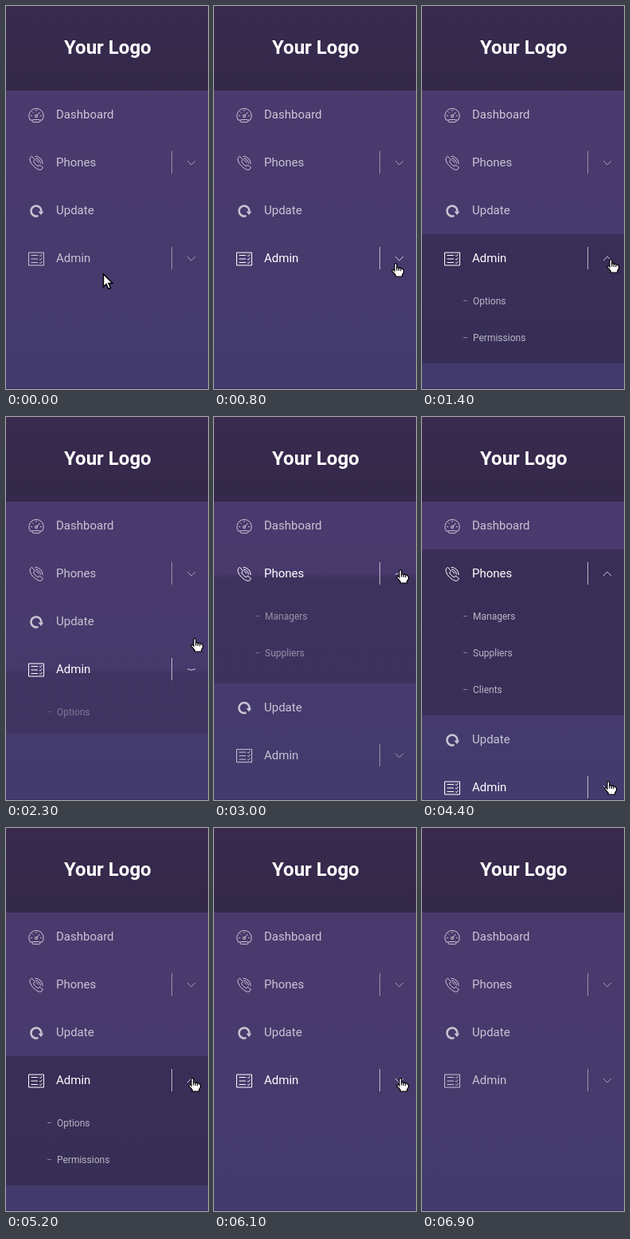
These frames come from a looping animation (254x480 px, 8 s). An HTML page with a canvas:

```html
<!DOCTYPE html>
<html lang="en">
<head>
<meta charset="utf-8">
<title>Side menu</title>
<style>
  html, body { margin: 0; width: 100%; height: 100%; overflow: hidden; background: #433b6d; }
  canvas { display: block; }
</style>
</head>
<body>
<canvas id="stage" width="254" height="480"></canvas>
<script>
const W = 254, H = 480, LOOP = 8000, STEP = 100;
const HEADER = 106, ROW = 60, SUB = 46, SUB_PAD = 10;
const ctx = document.getElementById('stage').getContext('2d');

// Icons are drawn around the centre of their row.
const icons = {
  gauge: new Path2D('M-5 6.5H-7.5A9.2 9.2 0 1 1 7.5 6.5H5M-3.5 6H3.5A1.5 1.5 0 0 1 3.5 9H-3.5A1.5 1.5 0 0 1 -3.5 6M-1.5 1.5A1.5 1.5 0 1 0 1.5 1.5A1.5 1.5 0 1 0 -1.5 1.5M1 .5L4.5 -3.5M-6.8 1H-5M5 1H6.8M-5 -4L-3.8 -2.8M0 -6.5V-4.7'),
  phone: new Path2D('M-8 -6L-5.5 -8.2L-1.5 -3.5L-3.5 -1.5Q-1.5 2.5 2.5 4.5L4.2 2.5L8.5 6L6.5 8.5Q3.5 10 -2.5 5Q-8.5 -.5 -8 -6ZM-1.5 -8.2Q7.5 -7.5 8.2 1.5M-1 -5.5Q4.8 -5 5.5 1M0 -3Q2.5 -2.5 3 0'),
  refresh: new Path2D('M2.5 6.4A6.5 6.5 0 1 1 6.4 1'),
  refreshTip: new Path2D('M2.5 1H9.2L6 5.5Z'),
  list: new Path2D('M-9.5 -7.5H9.5V8.5H-9.5ZM-6.5 -4H2M-6.5 .5H2M-6.5 5H2M4 -4L5.2 -2.8L7.5 -5.5M4 .5L5.2 1.7L7.5 -1M4 5L5.2 6.2L7.5 3.5')
};
const arrow = new Path2D('M.5 1V17L4.2 13.5L6.8 19.5L9.6 18.3L7 12.5H12Z');
const hand = new Path2D('M-1 9V2Q-1 .7 .4 .7T1.8 2V6Q3.3 5.2 4.3 6.4Q5.8 5.8 6.8 7Q8.5 6.6 9.4 8Q10.5 8.3 10.5 10V12L8.8 14.5V17H.2V15L-4 10.5Q-4.7 9 -3.2 8.6Q-2 8.5 -1 10Z');
const knuckles = new Path2D('M1.8 6V9.5M4.3 7V9.8M6.8 7.5V10.2');

// hover: [enter, leave] times; slide: [start, duration, open?]
const menu = [
  { label: 'Dashboard', icon: 'gauge', hover: [], subs: [], slide: [] },
  { label: 'Phones', icon: 'phone', hover: [[2700, 4500]],
    subs: ['Managers', 'Suppliers', 'Clients'],
    slide: [[2805, 300, 1], [4500, 300, 0]] },
  { label: 'Update', icon: 'refresh', hover: [], subs: [], slide: [] },
  { label: 'Admin', icon: 'list', hover: [[500, 2300], [4100, 6600]],
    subs: ['Options', 'Permissions'],
    slide: [[1100, 300, 1], [2205, 190, 0], [4500, 300, 1], [5800, 300, 0]] }
];

// Pointer hot spot: time, x, y
const pointer = [
  [0, 122, 335], [400, 185, 229], [600, 215, 262], [800, 228, 322],
  [900, 236, 316], [1000, 237, 317], [2200, 237, 317], [2300, 237, 277],
  [2700, 234, 205], [3000, 234, 191], [3600, 234, 191], [4400, 234, 456],
  [4500, 234, 457], [4600, 234, 457], [5200, 234, 313], [6100, 234, 313],
  [6600, 262, 252], [LOOP, 262, 252]
];

const clamp = v => Math.min(1, Math.max(0, v));
const swing = p => (1 - Math.cos(Math.PI * clamp(p))) / 2;
const white = a => `rgba(255,255,255,${a})`;

function openness(item, t) {
  const current = item.slide.filter(s => t >= s[0]).pop();
  if (!current) return 0;
  const p = swing((t - current[0]) / current[1]);
  return current[2] ? p : 1 - p;
}

function hoverLevel(item, t) {
  return item.hover.reduce((sum, [on, off]) =>
    sum + clamp((t - on) / 300) - clamp((t - off) / 300), 0);
}

function fillGradient(y, h, ...stops) {
  const g = ctx.createLinearGradient(0, y, 0, y + h);
  stops.forEach(([at, color]) => g.addColorStop(clamp(at), color));
  ctx.fillStyle = g;
  ctx.fillRect(0, y, W, h);
}

function text(str, x, y, size, color, weight = 400) {
  ctx.font = `${weight} ${size}px Roboto, sans-serif`;
  ctx.fillStyle = color;
  ctx.fillText(str, x, y);
}

function strokeAt(path, x, y, width, color) {
  ctx.save();
  ctx.translate(x, y);
  ctx.lineWidth = width;
  ctx.strokeStyle = color;
  ctx.stroke(path);
  ctx.restore();
}

function drawIcon(name, y, color) {
  const thick = name === 'refresh';
  strokeAt(icons[name], 38, y + .5, thick ? 2.6 : 1, color);
  if (!thick) return;
  ctx.save();
  ctx.translate(38, y + .5);
  ctx.fillStyle = color;
  ctx.fill(icons.refreshTip);
  ctx.restore();
}

function drawToggle(y, open, level) {
  ctx.fillStyle = white(.65 * level);
  ctx.fillRect(208, y - 14, 1, 28);
  const bend = 2.5 * (1 - 2 * open ** 1.5);
  strokeAt(new Path2D(`M-5 ${-bend}L0 ${bend}L5 ${-bend}`), 233, y + .5, 1, white(.75 * level));
}

function drawItem(item, top, t) {
  const open = openness(item, t);
  const full = item.subs.length * SUB + SUB_PAD;
  const height = item.subs.length ? full * open : 0;
  const mid = top + ROW / 2;
  const level = .7 + .3 * hoverLevel(item, t);

  if (open > 0) {
    const total = ROW + height;
    const shade = `rgba(49,40,75,${.65 * open})`;
    const start = open === 1 ? shade : 'rgba(49,40,75,.03)';
    fillGradient(top, total, [0, start], [30 / total, start], [36 / total, shade], [1, shade]);

    ctx.save();
    ctx.beginPath();
    ctx.rect(0, top + ROW, W, height);
    ctx.clip();
    item.subs.forEach((sub, i) => {
      const y = top + ROW + 24 + i * SUB;
      text(sub, 64, y + 4, 12, white(.65 * open));
      ctx.fillStyle = white(.4 * open);
      ctx.fillRect(52, y - 1, 5, 1);
    });
    ctx.restore();
  }

  drawIcon(item.icon, mid, white(level));
  text(item.label, 63, mid + 5, 15, white(level));
  if (item.subs.length) drawToggle(mid, open, level);
  return top + ROW + height;
}

function drawPointer(t) {
  const i = pointer.findIndex(k => k[0] > t);
  const [t0, x0, y0] = pointer[i - 1], [t1, x1, y1] = pointer[i];
  const p = (t - t0) / (t1 - t0);
  const isArrow = t < 300;
  ctx.save();
  ctx.translate(Math.round(x0 + (x1 - x0) * p), Math.round(y0 + (y1 - y0) * p));
  ctx.lineWidth = isArrow ? 1.5 : 1.2;
  ctx.strokeStyle = '#000';
  ctx.fillStyle = '#fff';
  const shape = isArrow ? arrow : hand;
  ctx.fill(shape);
  ctx.stroke(shape);
  if (!isArrow) ctx.stroke(knuckles);
  ctx.restore();
}

function draw(t) {
  fillGradient(0, H, [0, '#4d3a6d'], [HEADER / H, '#4b396d'], [1, '#433b6d']);
  fillGradient(0, HEADER, [0, '#392a4e'], [1, '#34294a']);
  text('Your Logo', 73, 60, 24, '#fff', 700);
  menu.reduce((top, item) => drawItem(item, top, t), HEADER);
  ctx.fillStyle = 'rgba(40,32,70,.4)';
  ctx.fillRect(0, H - 1, W, 1);
  drawPointer(t);
}

function tick() {
  const t = performance.now() % LOOP;
  draw(Math.floor(t / STEP) * STEP);
  requestAnimationFrame(tick);
}
tick();
</script>
</body>
</html>
```
